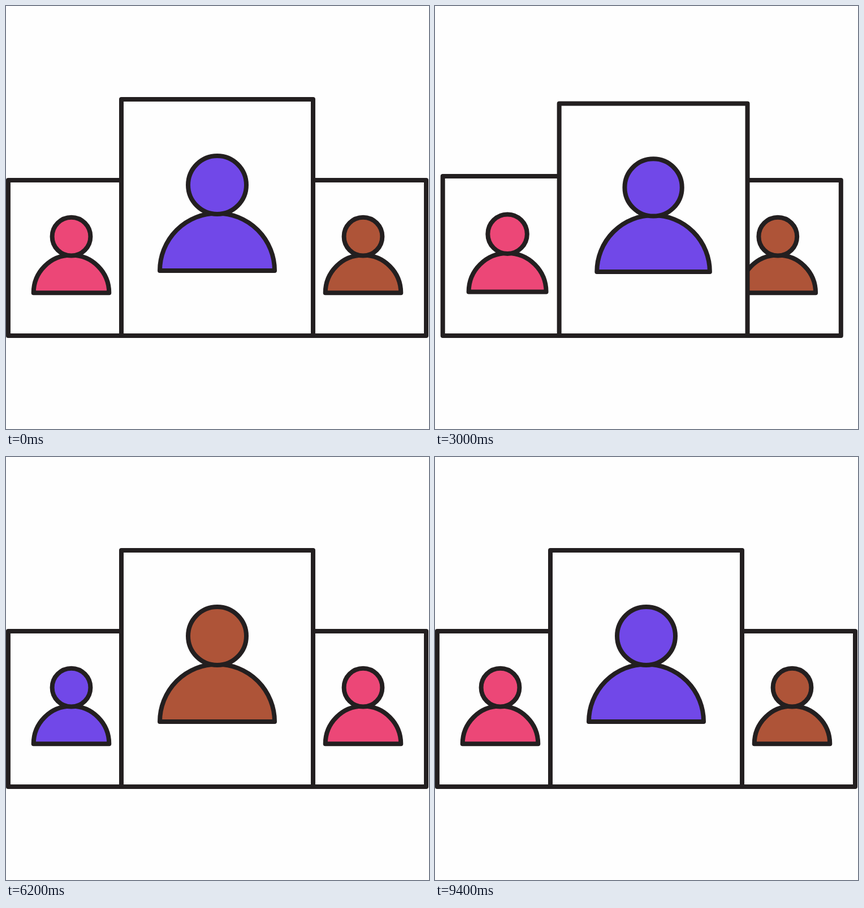
Animation, 748 px wide and 748 px high, one loop 9.6 s. Source, as an HTML page with a canvas:

```html
<!DOCTYPE html>
<html lang="en">
<head>
<meta charset="utf-8">
<title>Card carousel</title>
<style>
  html, body { margin: 0; width: 100%; height: 100%; overflow: hidden; background: #fefefe; }
  canvas { display: block; width: 748px; height: 748px; }
</style>
</head>
<body>
<canvas id="stage" width="748" height="748"></canvas>
<script>
const ctx = document.getElementById('stage').getContext('2d');
const PAPER = '#fefefe', INK = '#231f20';
const FLOOR = 583, MIDDLE = 373.5, SPREAD = 258, SMALL = 0.658;
const PERIOD = 4800, FIRST_TURN = 400, TURN = 1000, STEP = 100;

// Every card goes centre, left, right and back to the centre.
const slots = [
  { x: MIDDLE, scale: 1 },
  { x: MIDDLE - SPREAD, scale: SMALL },
  { x: MIDDLE + SPREAD, scale: SMALL }
];
const colors = ['#7148e8', '#ec4777', '#ae5438'];   // starting in slots 0, 1, 2

// Slow start, quick middle, long settle
function ease(u) {
  const gone = 40 * u ** 4.62, left = (1 - u) ** 1.79;
  return gone / (gone + left);
}

function mix(a, b, p) {
  return a + (b - a) * p;
}

function cardAt(index, turn, p) {
  const from = slots[(index + turn) % 3], to = slots[(index + turn + 1) % 3];
  const scale = mix(from.scale, to.scale, p);
  // The frame of a growing card lags behind its figure half-way.
  const lag = to.scale > from.scale ? 0.04 * (4 * p * (1 - p)) ** 2 : 0;
  return { color: colors[index], x: mix(from.x, to.x, p), scale, frame: scale * (1 - lag) };
}

function paint(fill) {
  ctx.fillStyle = fill;
  ctx.fill();
  ctx.stroke();
}

function drawCard({ color, x, scale, frame }) {
  const width = 339 * frame, height = 418 * frame;
  ctx.beginPath();
  ctx.rect(x - width / 2, FLOOR - height, width, height);
  paint(PAPER);
  ctx.beginPath();
  ctx.arc(x, FLOOR - 115 * scale, 101.5 * scale, Math.PI, 0);
  ctx.closePath();
  paint(color);
  ctx.beginPath();
  ctx.arc(x, FLOOR - 266.5 * scale, 51.5 * scale, 0, 2 * Math.PI);
  paint(color);
}

function draw(ms) {
  const time = Math.floor((ms % PERIOD) / STEP) * STEP;
  const turns = Math.min(Math.max((time - FIRST_TURN) / TURN, 0), 3);
  const turn = Math.floor(turns), p = ease(turns - turn);

  ctx.fillStyle = PAPER;
  ctx.fillRect(0, 0, 748, 748);
  ctx.strokeStyle = INK;
  ctx.lineWidth = 8;
  ctx.lineJoin = 'round';
  colors
    .map((_, index) => cardAt(index, turn, p))
    .sort((a, b) => a.scale - b.scale)   // largest card in front
    .forEach(drawCard);
}

const start = performance.now();
function tick() {
  draw(performance.now() - start);
  requestAnimationFrame(tick);
}
tick();
</script>
</body>
</html>
```
